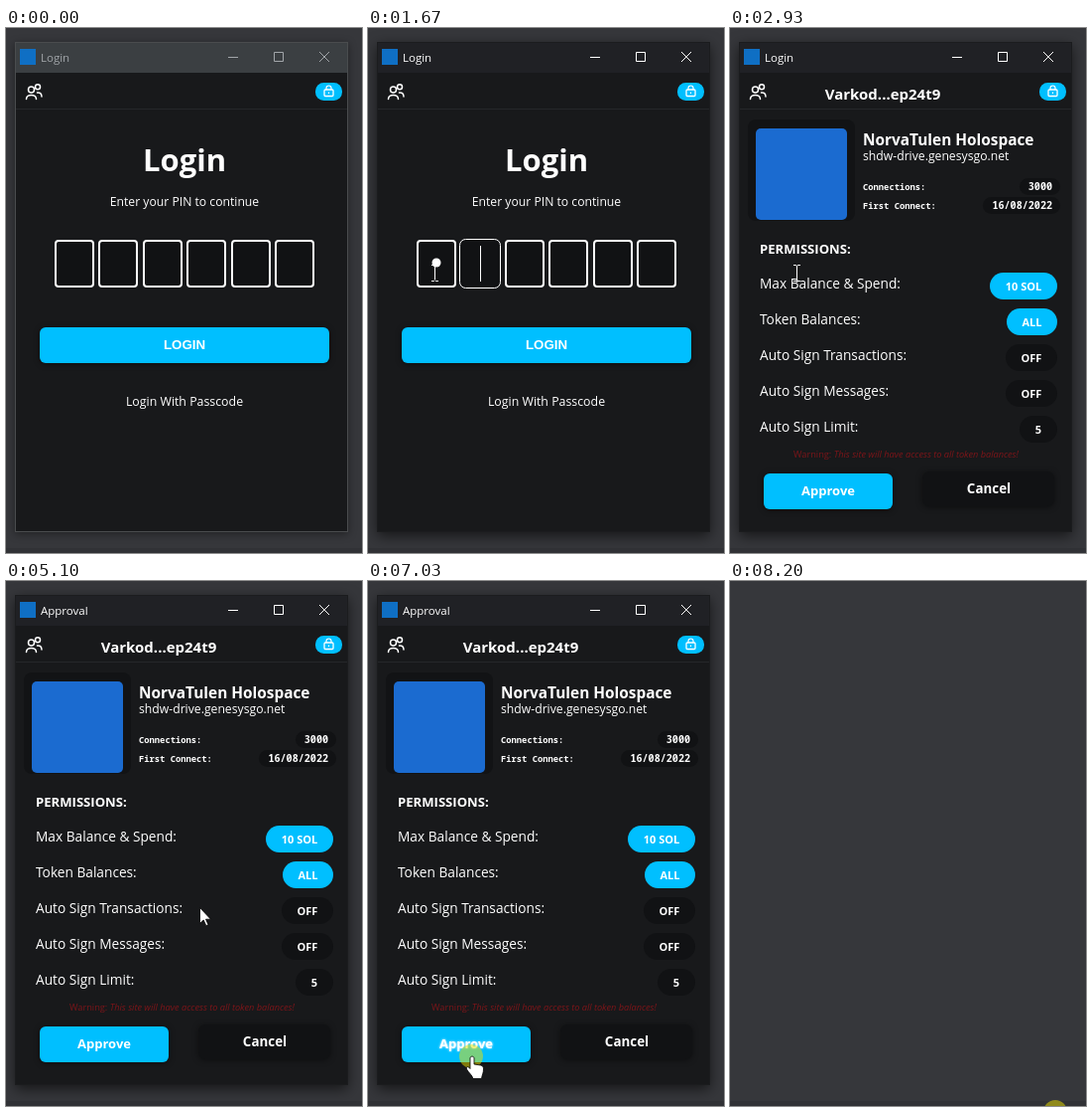
Write an HTML page that moves like this. It is 359 by 528 pixels and loops after 8.28 s.

```html
<!DOCTYPE html>
<html lang="en">
<head>
<meta charset="utf-8">
<title>Login</title>
<style>
  html, body { margin: 0; width: 100%; height: 100%; overflow: hidden; background: #36373b; }
  svg { display: block; width: 359px; height: 528px; }
  text { font-family: "Open Sans", "Noto Sans", sans-serif; fill: #fff; white-space: pre; }
  .bold { font-weight: 700; }
  .mono { font-family: "Noto Sans Mono", monospace; font-weight: 700; }
  .mid { text-anchor: middle; }
  .line { fill: none; stroke: #fff; }
  .blue { fill: #00bfff; }
  .dark { fill: #111214; }
  .shade { filter: drop-shadow(0 1px 3px #0007); }
  #window { filter: drop-shadow(0 2px 4px #0006); }
  #window.active { filter: drop-shadow(0 4px 7px #0009); }
  #bar { fill: #3b3f42; }
  #frame { fill: none; stroke: #4a4c4e; }
  #caption text { fill: #a2a6aa; }
  #caption { stroke: #a2a6aa; fill: none; }
  #caption text { stroke: none; font-size: 11.5px; }
  .active #bar { fill: #202125; }
  .active #frame { stroke: #1b1c1e; }
  .active #caption { stroke: #fff; }
  .active #caption text { fill: #fff; }
  #approve.hover { filter: drop-shadow(0 0 1px #fff); }
  #pointers path { stroke-linejoin: round; }
</style>
</head>
<body>
<svg viewBox="0 0 359 528">
  <rect width="359" height="528" fill="#36373b"/>
  <rect y="523" width="359" height="5" fill="#313236"/>

  <g id="window">
    <rect x="9" y="14" width="336" height="493" fill="#18191b"/>
    <rect id="bar" x="9" y="14" width="336" height="31"/>
    <rect id="frame" x="9.5" y="14.5" width="335" height="492"/>
    <rect x="14" y="21" width="16" height="16" fill="#0f6fc4"/>
    <g id="caption">
      <text id="title" x="35" y="34">Login</text>
      <path d="M224 29.5H234M270.5 24.5H279.5V33.5H270.5ZM316 24L326 34M326 24L316 34"/>
    </g>
    <path d="M10 81.5H344" stroke="#25272a"/>
    <g class="line" stroke-width="1.5" stroke-linecap="round">
      <circle cx="25.5" cy="62" r="3"/>
      <circle cx="32" cy="59.3" r="2.5"/>
      <path d="M20.5 71.5C20.5 66 30.500 66 30.500 71.500M31.500 65C34 64.500 36 66 36 69"/>
    </g>
    <rect class="blue" x="312" y="55" width="27" height="18" rx="8.500"/>
    <rect class="line" x="321" y="62" width="9" height="6.500" rx="1" stroke-width="1.300"/>
    <path class="line" d="M323 62V60.500A2.500 2.500 0 0 1 328 60.500V62M325.500 64.500V66" stroke-width="1.200"/>

    <g id="login">
      <text class="bold mid" x="180" y="144" font-size="31">Login</text>
      <text class="mid" x="180" y="179" font-size="12.200">Enter your PIN to continue</text>
      <g id="pins"></g>
      <g class="shade"><rect class="blue" x="34" y="301" width="292" height="36" rx="6"/></g>
      <text class="bold mid" x="180" y="323" font-size="13.330" style="font-family:'Liberation Sans',Arial,sans-serif">LOGIN</text>
      <text class="mid" x="180" y="380" font-size="12.350">Login With Passcode</text>
    </g>

    <g id="approval">
      <text class="bold mid" x="154" y="72" font-size="15">Varkod...ep24t9</text>
      <rect x="18" y="92" width="108" height="102" rx="8" fill="#121315"/>
      <rect x="26" y="101" width="92" height="92" rx="5" fill="#1b6bd0"/>
      <text class="bold" x="134" y="118" font-size="15.400">NorvaTulen Holospace</text>
      <text x="134" y="133" font-size="12.200">shdw-drive.genesysgo.net</text>
      <g class="dark">
        <rect x="292" y="151" width="41" height="17" rx="8.500"/>
        <rect x="255" y="170" width="78" height="17" rx="8.500"/>
      </g>
      <g font-size="8.800">
        <text class="mono" x="134" y="163">Connections:</text>
        <text class="mono" x="134" y="182">First Connect:</text>
      </g>
      <g font-size="10.100" text-anchor="end">
        <text class="mono" x="325" y="163">3000</text>
        <text class="mono" x="325" y="182">16/08/2022</text>
      </g>
      <text class="bold" x="30" y="227" font-size="13.100">PERMISSIONS:</text>
      <g id="rows"></g>
      <text x="64" y="432" font-size="9.200" style="fill:#7c1519">Warning: <tspan font-style="italic">This site will have access to all token balances!</tspan></text>
      <g class="shade">
        <rect class="blue" x="34" y="448" width="130" height="36" rx="6"/>
        <rect class="dark" x="194" y="446" width="133" height="35" rx="7"/>
      </g>
      <text id="approve" class="bold mid" x="99" y="470" font-size="13">Approve</text>
      <text class="bold mid" x="261" y="468" font-size="13.400">Cancel</text>
    </g>
  </g>

  <circle id="press" r="12" fill="#f0e100" fill-opacity=".5"/>
  <g id="pointers">
    <path id="ibeam" class="line" d="M-3 -7.500H0M1 -7.500H4M.500 -7V7.500M-3 8.500H0M1 8.500H4" stroke="#ddd"/>
    <path id="arrow" d="M.500 .500V16.500L4.200 13 6.800 18.700 9 17.700 6.500 12.200H11.500Z" fill="#fff" stroke="#000" stroke-width=".8"/>
    <path id="hand" d="M-1 11V2C-1 -.500 3 -.500 3 2V8L9.500 9C12 9.500 12.500 11 12.500 13C12.500 17 11 18.500 10.500 22.500H2C1 19 -2 17 -4.500 13C-5.500 10.500 -3 9.500 -1 12.500Z" fill="#fff" stroke="#000" stroke-width=".8"/>
  </g>
</svg>

<script>
const LOOP = 8280, STEP = 83.3;
const FOCUS = 840, CARET_OFF = 1330, VIEW = 2850, RENAME = 3110, CLOSE = 7120;
const KEYS = [1670, 1920, 2080, 2420, 2600, 2760];
const PRESSES = [[840, 920, 67, 246], [7030, 7120, 104, 478], [8200, LOOP, 328, 534]];

const linear = u => u;
const easeOut = u => 1 - (1 - u) ** 2;
const smooth = u => u * u * (3 - 2 * u);

// Each move follows a quadratic curve in n equal time steps.
const MOVES = [
  { at: 170, n: 8, path: [[250, 540], [95, 340], [67, 246]], ease: easeOut },
  { at: 3780, n: 8, path: [[67, 246], [140, 219], [206, 214]], ease: smooth },
  { at: 4770, n: 10, path: [[206, 214], [209, 344], [156, 409]], ease: linear },
  { at: 5610, n: 7, path: [[156, 409], [128, 442], [104, 478]], ease: easeOut },
  { at: 7620, n: 1, path: [[104, 478], [106, 478], [108, 478]], ease: linear }
];

const $ = id => document.getElementById(id);
const show = (el, on) => { el.style.display = on ? "" : "none"; };
const inside = (t, from, to) => t >= from && t < to;

$("pins").innerHTML = KEYS.map((_, i) => {
  const x = Math.round(49 + 44.4 * i);
  return `<g>
    <rect class="dark" x="${x + 1}" y="214" width="38" height="46" rx="3"/>
    <rect class="line" x="${x + 1}" y="214" width="38" height="46" rx="3" stroke-width="2"/>
    <rect class="line" x="${x - .5}" y="212.500" width="41" height="49" rx="6"/>
    <path class="line" d="M${x + 20.5} 219V255" stroke="#ccc"/>
    <circle cx="${x + 20}" cy="236" r="4.500" fill="#fff"/>
  </g>`;
}).join("");
const pins = [...$("pins").children].map(g => {
  const [, frame, ring, caret, dot] = g.children;
  return { frame, ring, caret, dot };
});

$("rows").innerHTML = [
  ["Max Balance &amp; Spend:", "10 SOL", 262, "blue"],
  ["Token Balances:", "ALL", 279, "blue"],
  ["Auto Sign Transactions:", "OFF", 278, "dark"],
  ["Auto Sign Messages:", "OFF", 278, "dark"],
  ["Auto Sign Limit:", "5", 292, "dark"]
].map(([label, value, x, tone], i) => `<g transform="translate(0 ${36 * i})">
  <text x="30" y="262" font-size="13.700">${label}</text>
  <rect class="${tone}" x="${x}" y="246" width="${330 - x}" height="27" rx="13.500"/>
  <text class="bold mid" x="${(x + 330) / 2}" y="264" font-size="11">${value}</text>
</g>`).join("");

function pointerAt(t) {
  const move = MOVES.findLast(m => t >= m.at);
  if (!move || t >= 7700) return null;
  const done = Math.floor((t - move.at + 5) / STEP) + 1;
  const u = move.ease(Math.min(1, done / move.n));
  const [a, b, c] = move.path;
  return [0, 1].map(k => (1 - u) ** 2 * a[k] + 2 * u * (1 - u) * b[k] + u * u * c[k]);
}

function pointerKind([x, y], t) {
  if (t >= CLOSE) return "arrow";
  if (t < 3780) {
    if (y > 301 && y < 337) return "hand";
    return y < 261 ? "ibeam" : "arrow";
  }
  if (t < 4770) return y > 236 ? "ibeam" : "arrow";
  return y > 448 && x < 164 ? "hand" : "arrow";
}

function drawPins(t) {
  pins.forEach(({ frame, ring, caret, dot }, i) => {
    const from = i ? KEYS[i - 1] : FOCUS;
    const to = i < 5 ? KEYS[i] : VIEW;
    const focused = inside(t, from, to);
    show(frame, !focused);
    show(ring, focused);
    show(caret, focused && t < KEYS[i] && !inside(t, CARET_OFF, KEYS[0]));
    show(dot, t >= KEYS[i]);
  });
}

function draw(t) {
  show($("window"), t < CLOSE);
  $("window").classList.toggle("active", t >= FOCUS);
  show($("login"), t < VIEW);
  show($("approval"), t >= VIEW);
  $("title").textContent = t < RENAME ? "Login" : "Approval";
  drawPins(t);

  const pos = pointerAt(t), kind = pos && pointerKind(pos, t);
  for (const id of ["ibeam", "arrow", "hand"]) show($(id), id === kind);
  if (pos) $("pointers").setAttribute("transform", `translate(${pos.map(Math.round)})`);
  $("approve").classList.toggle("hover", t > 5610 && kind === "hand");

  const press = PRESSES.find(([from, to]) => inside(t, from, to));
  show($("press"), press);
  if (press) $("press").setAttribute("transform", `translate(${press.slice(2)})`);
}

const start = performance.now();
function tick() {
  draw((performance.now() - start) % LOOP);
  requestAnimationFrame(tick);
}
tick();
</script>
</body>
</html>
```
